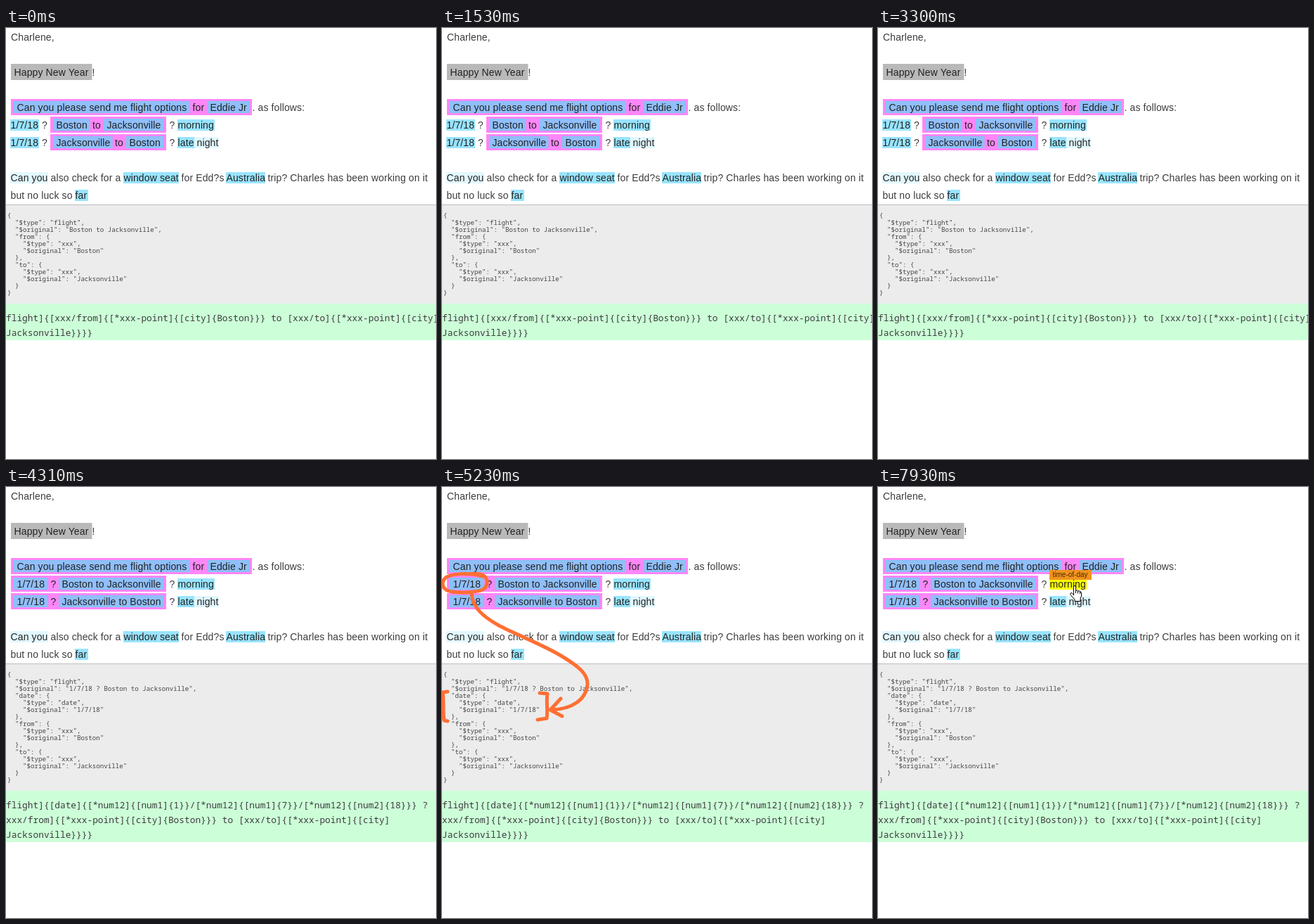
An HTML page for the animation above (8000 ms loop, 612 by 613 pixels).

```html
<!DOCTYPE html>
<html>
<head>
<meta charset="utf-8">
<style>
html, body { margin: 0; width: 100%; height: 100%; overflow: hidden; background: #fff; }
svg { display: block; }
text { white-space: pre; fill: #3c3c3c; font: 14px "Liberation Sans", Arial, sans-serif; letter-spacing: .12px; }
text.on { fill: #222; }
text.json { fill: #444; font: 9.1667px "Noto Sans Mono", monospace; letter-spacing: 0; }
text.code { font: 12.8333px "Noto Sans Mono", monospace; letter-spacing: 0; }
text.tip { fill: #4a2c00; font-size: 10px; letter-spacing: 0; }
.ink { fill: none; stroke: #ff6f33; stroke-width: 5; stroke-linecap: round; stroke-linejoin: round; }
#hand { fill: #fff; stroke: #000; stroke-linejoin: round; }
</style>
</head>
<body>
<svg id="stage" width="612" height="613" viewBox="0 0 612 613">
  <g id="base"></g>
  <g id="route"></g>
  <g id="dated"></g>
  <g id="dateTip"></g>
  <g id="timeTip"></g>
  <g id="routeInk" class="ink">
    <path d="M70 122C110 112 215 113 230 128C242 150 200 153 140 153C85 154 56 150 57 137C58 126 75 119 110 117"/>
    <path d="M152 153C165 195 215 215 238 250C256 285 235 322 190 332M204 317L188 332L206 342"/>
    <path d="M13 292L7 293L7 371L13 372M168 292L180 293L181 371L169 372"/>
  </g>
  <g id="dateInk" class="ink">
    <path d="M58 127C42 122 12 122 4 130C-2 138 1 147 14 149C28 151 48 150 58 146C66 141 66 130 59 126C54 123 44 123 36 124"/>
    <path d="M42 152C44 172 58 184 81 197C108 211 145 225 171 241C196 256 208 267 207 281C205 302 186 316 155 317M169 301L154 317L171 326"/>
    <path d="M8 291L1 292C3 306 1 320 3 332L8 333M139 293L150 294C148 306 151 318 149 329L136 331"/>
  </g>
  <g id="hand">
    <path d="M5.5 14V2Q5.5.5 7 .5T8.5 2V7.5Q11 6 11.5 8Q14 6.8 14.5 9Q16.5 8.3 16.5 11V15L15 19V22.5H7V20L1 13.5Q0 11 2 10.5Q3.5 10.5 5.5 13.5"/>
    <path fill="none" d="M8.5 7.5V11M11.5 8V11.5M14.5 9V12"/>
  </g>
</svg>
<script>
const $ = id => document.getElementById(id);
const CYAN = '#99e4ff', PALE = '#e2f8ff', PINK = '#ff86f8', YELLOW = '#ffff00';

function add(group, tag, attrs, content = '') {
  const el = document.createElementNS('http://www.w3.org/2000/svg', tag);
  for (const key in attrs) el.setAttribute(key, attrs[key]);
  el.textContent = content;
  $(group).append(el);
}
const box = (g, x, y, right, bottom, fill) =>
  add(g, 'rect', { x, y, width: right - x, height: bottom - y, fill });
const text = (g, x, y, s, cls = '') => add(g, 'text', { x, y, class: cls }, s);

// Words of the letter are placed by the middle of their line.
const word = (g, x, mid, s, cls) => text(g, x, mid + 5, s, cls);
const mark = (g, x, right, mid, fill) => box(g, x, mid - 8, right, mid + 8, fill);
const outer = (g, x, right, mid, fill = PINK) => box(g, x, mid - 12, right, mid + 11, fill);
function inner(g, x, right, mid, s) {
  box(g, x, mid - 9, right, mid + 8, '#7cc6ee');
  box(g, x + 1, mid - 8, right - 1, mid + 7, '#90bffb');
  word(g, x + 4.5, mid, s, 'on');
}

function panel(g, json, code) {
  const split = 392 + (json.length - 12) * 10;
  box(g, 0, 251, 612, split, '#ececec');
  box(g, 0, 251, 612, 252, '#bdbdbd');
  box(g, 0, split, 612, split + 10 + code.length * 21, '#ccffd8');
  json.forEach((s, i) => text(g, 2, 270 + i * 10, s, 'json'));
  code.forEach((s, i) => text(g, 0, split + 25 + i * 21, s, 'code'));
}
const field = (name, type, original, end) =>
  [`  "${name}": {`, `    "$type": "${type}",`, `    "$original": "${original}"`, '  }' + end];
const flight = (original, ...fields) =>
  ['{', '  "$type": "flight",', `  "$original": "${original}",`, ...fields.flat(), '}'];
const from = field('from', 'xxx', 'Boston', ','), to = field('to', 'xxx', 'Jacksonville', '');

// Parts of the letter that never change
word('base', 7, 13, 'Charlene,');
outer('base', 7, 122.5, 63, '#b9b9b9');
word('base', 11.5, 63, 'Happy New Year', 'on');
word('base', 122.5, 63, '!');
outer('base', 7, 350, 113);
inner('base', 11, 262, 113, 'Can you please send me flight options');
word('base', 265.5, 113, 'for', 'on');
inner('base', 286, 346, 113, 'Eddie Jr');
word('base', 350.5, 113, '. as follows:');
word('base', 232.5, 138, '?');
mark('base', 244, 297, 138, CYAN);
word('base', 244.5, 138, 'morning', 'on');
word('base', 232.5, 163, '?');
mark('base', 244, 268, 163, CYAN);
mark('base', 268, 303, 163, PALE);
word('base', 244.5, 163, 'late night', 'on');
mark('base', 6, 60, 213, PALE);
word('base', 6.5, 213, 'Can you', 'on');
word('base', 63.5, 213, 'also check for a');
mark('base', 167, 246, 213, CYAN);
word('base', 167.5, 213, 'window seat', 'on');
word('base', 249.5, 213, 'for Edd?s');
mark('base', 313, 369, 213, CYAN);
word('base', 313.5, 213, 'Australia', 'on');
word('base', 372.5, 213, 'trip? Charles has been working on it');
word('base', 6.5, 238, 'but no luck so');
mark('base', 98, 117, 238, CYAN);
word('base', 98.5, 238, 'far', 'on');

// Only the route is recognised
for (const [mid, split, a, b] of [[138, 119, 'Boston', 'Jacksonville'], [163, 151, 'Jacksonville', 'Boston']]) {
  mark('route', 6, 47, mid, CYAN);
  word('route', 6.5, mid, '1/7/18', 'on');
  word('route', 51, mid, '?');
  outer('route', 63, 228, mid);
  inner('route', 67, split + .5, mid, a);
  word('route', split + 4, mid, 'to', 'on');
  inner('route', split + 20, 224, mid, b);
}
panel('route', flight('Boston to Jacksonville', from, to), [
  'flight]{[xxx/from]{[*xxx-point]{[city]{Boston}}} to [xxx/to]{[*xxx-point]{[city]',
  'Jacksonville}}}}'
]);

// Date and route together
for (const [mid, trip] of [[138, 'Boston to Jacksonville'], [163, 'Jacksonville to Boston']]) {
  outer('dated', 7, 228, mid);
  inner('dated', 11, 60, mid, '1/7/18');
  word('dated', 63.5, mid, '?', 'on');
  inner('dated', 75, 224, mid, trip);
}
panel('dated', flight('1/7/18 ? Boston to Jacksonville', field('date', 'date', '1/7/18', ','), from, to), [
  'flight]{[date]{[*num12]{[num1]{1}}/[*num12]{[num1]{7}}/[*num12]{[num2]{18}}} ?',
  'xxx/from]{[*xxx-point]{[city]{Boston}}} to [xxx/to]{[*xxx-point]{[city]',
  'Jacksonville}}}}'
]);

function tip(g, x, right, tipRight, s, label) {
  mark(g, x, right, 138, YELLOW);
  word(g, x + .5, 138, s, 'on');
  box(g, x, 118, tipRight, 132, '#f0931f');
  text(g, x + 4.5, 128, label, 'tip');
}
tip('dateTip', 6, 47, 36, '1/7/18', 'date');
tip('timeTip', 244, 297, 304, 'morning', 'time-of-day');

// Pointer: start time, x, y; no place means hidden
const pointer = [
  [0], [1990, 1, 138], [2070, 8, 138], [2150, 16, 138], [3140, 10, 138], [3220, 5, 138], [3300],
  [6940, 287, 140], [7010, 278, 140], [7070, 269, 139.5], [7930, 273, 140]
];
const show = (id, on) => $(id).style.display = on ? '' : 'none';
const within = (t, a, b) => t >= a && t < b;

function draw(now) {
  const t = now % 8000;
  show('route', t < 4310);
  show('dated', t >= 4310);
  show('routeInk', within(t, 370, 1530));
  show('dateInk', within(t, 4770, 5000) || within(t, 5230, 6940));
  show('dateTip', within(t, 1990, 3300));
  show('timeTip', t >= 7010);
  const [, x, y] = pointer.findLast(p => p[0] <= t);
  show('hand', x !== undefined);
  if (x !== undefined) $('hand').setAttribute('transform', `translate(${x} ${y})`);
}
const start = performance.now();
(function loop() {
  draw(performance.now() - start);
  requestAnimationFrame(loop);
})();
</script>
</body>
</html>
```
